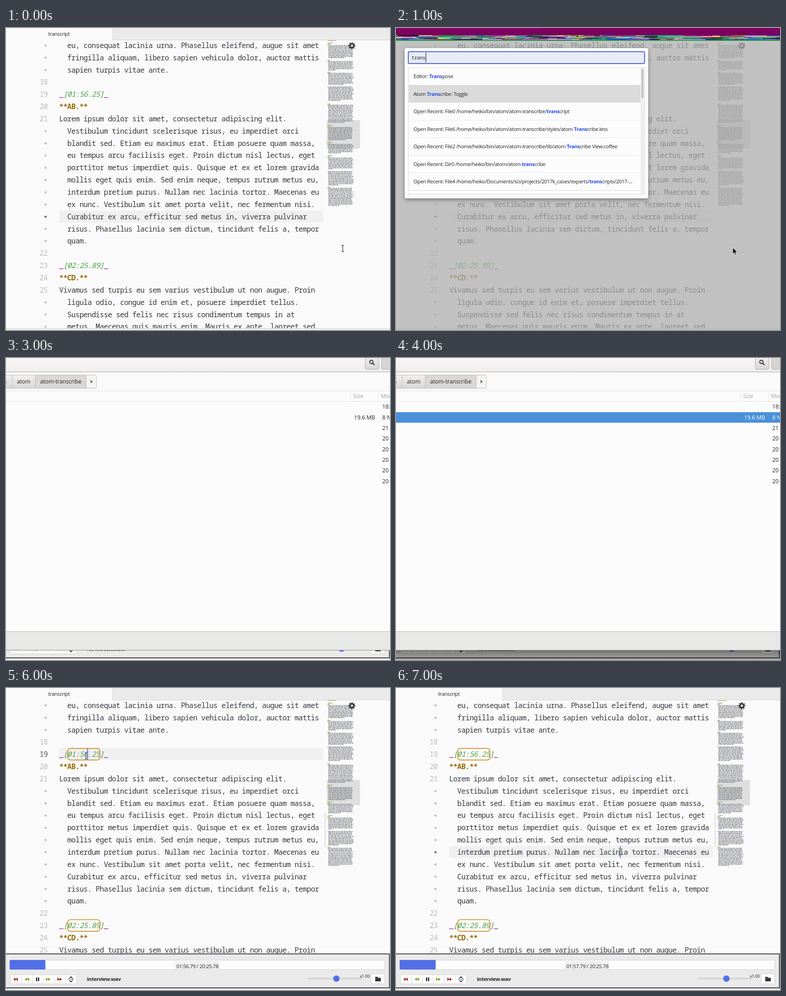
These frames come from a looping animation (845x663 px, 8000 ms). An HTML page:

```html
<!DOCTYPE html>
<html lang="en">
<head>
<meta charset="utf-8">
<title>Transcribe demo</title>
<style>
html, body { margin: 0; width: 100%; height: 100%; overflow: hidden; background: #fafafa; }
svg { display: block; width: 845px; height: 663px; }
text { white-space: pre; }
.code { font: 16px "Noto Sans Mono", monospace; letter-spacing: -.67px; fill: #383a42; }
.num { fill: #bdbdbd; }
.ui { font: 11.3px "Open Sans", "Noto Sans", sans-serif; letter-spacing: -.37px; fill: #232324; }
.b { font-weight: 700; }
.hit { font-weight: 700; fill: #2450e8; }
.field { font: 11px "Noto Sans Mono", monospace; letter-spacing: -.45px; fill: #232324; }
.rate { font-size: 9.4px; letter-spacing: -.3px; }
.file { font: 12.2px "Open Sans", "Noto Sans", sans-serif; fill: #222; }
.mark { fill: #a626a4; }
.time { fill: #50a14f; font-style: italic; }
.name { fill: #986801; font-weight: 700; }
</style>
</head>
<body>
<svg id="stage" viewBox="0 0 845 663">
  <defs>
    <linearGradient id="button" x2="0" y2="1"><stop stop-color="#f1f0ef"/><stop offset="1" stop-color="#d8d7d5"/></linearGradient>
    <linearGradient id="header" x2="0" y2="1"><stop stop-color="#f6f5f4"/><stop offset="1" stop-color="#f0efee"/></linearGradient>
    <linearGradient id="shade" x2="0" y2="1"><stop stop-opacity=".3"/><stop offset="1" stop-opacity="0"/></linearGradient>
    <clipPath id="listClip"><path d="M27 87H538V365H27z"/></clipPath>
    <filter id="shadow" x="-10%" y="-10%" width="120%" height="120%"><feDropShadow dx="0" dy="3" stdDeviation="4" flood-opacity=".4"/></filter>
  </defs>
  <g id="scene"></g>
</svg>
<script>
const PITCH = 26.85, COL = 8.935, LEFT = 117;
const BLUE = '#526fe8';
const PROSE = [
  ['', 'eu, consequat lacinia urna. Phasellus eleifend, augue sit amet'],
  ['', 'fringilla aliquam, libero sapien vehicula dolor, auctor mattis'],
  ['', 'sapien turpis vitae ante.'],
  [18, ''], [19, '_[01:56.25]_'], [20, '**AB.**'],
  [21, 'Lorem ipsum dolor sit amet, consectetur adipiscing elit.'],
  ['', 'Vestibulum tincidunt scelerisque risus, eu imperdiet orci'],
  ['', 'blandit sed. Etiam eu maximus erat. Etiam posuere quam massa,'],
  ['', 'eu tempus arcu facilisis eget. Proin dictum nisl lectus, eget'],
  ['', 'porttitor metus imperdiet quis. Quisque et ex et lorem gravida'],
  ['', 'mollis eget quis enim. Sed enim neque, tempus rutrum metus eu,'],
  ['', 'interdum pretium purus. Nullam nec lacinia tortor. Maecenas eu'],
  ['', 'ex nunc. Vestibulum sit amet porta velit, nec fermentum nisi.'],
  ['', 'Curabitur ex arcu, efficitur sed metus in, viverra pulvinar'],
  ['', 'risus. Phasellus lacinia sem dictum, tincidunt felis a, tempor'],
  ['', 'quam.'],
  [22, ''], [23, '_[02:25.89]_'], [24, '**CD.**'],
  [25, 'Vivamus sed turpis eu sem varius vestibulum ut non augue. Proin'],
  ['', 'ligula odio, congue id enim et, posuere imperdiet tellus.'],
  ['', 'Suspendisse sed felis nec risus condimentum tempus in at'],
  ['', 'metus. Maecenas quis mauris enim. Mauris ex ante, laoreet sed']
];
const COMMANDS = [
  'Editor: *Trans*pose',
  'Atom *Trans*cribe: Toggle',
  'Open Recent: File0 /home/heiko/bin/atom/atom-transcribe/*trans*cript',
  'Open Recent: File6 /home/heiko/bin/atom/atom-transcribe/styles/atom *Trans*cribe.less',
  'Open Recent: File2 /home/heiko/bin/atom/atom-transcribe/lib/atom *Trans*cribe View.coffee',
  'Open Recent: Dir0 /home/heiko/bin/atom/atom-*trans*cribe',
  'Open Recent: File4 /home/heiko/Documents/sci/projects/2017k_cases/experts/*trans*cripts/2017-...'
];
// One entry per second
const STEPS = [
  { row: 14, view: 63, beam: [741, 484] },
  { row: 14, view: 63, palette: true },
  { row: 14, view: 58, caret: 395, bar: true, beam: [741, 484], torn: true },
  { row: 14, view: 58, bar: true, dialog: true },
  { row: 14, view: 58, bar: true, dialog: true, chosen: true },
  { row: 14, view: 55, caret: 395, bar: true, play: 2.98, beam: [176, 149] },
  { row: 4, view: 55, caret: 179.5, bar: true, play: 116.79, beam: [176, 149] },
  { row: 12, view: 55, caret: 493.5, bar: true, play: 117.79, beam: [493, 360] }
];

const rect = (x, y, w, h, fill, more = '') => `<rect x="${x}" y="${y}" width="${w}" height="${h}" fill="${fill}" ${more}/>`;
const path = (d, fill, more = '') => `<path d="${d}" fill="${fill}" ${more}/>`;
const line = (d, color, width = 1) => path(d, 'none', `stroke="${color}" stroke-width="${width}"`);
const text = (x, y, cls, s, more = '') => `<text x="${x}" y="${y}" class="${cls}" ${more}>${s}</text>`;
const span = (cls, s) => `<tspan class="${cls}">${s}</tspan>`;
const dot = (x, y, r, fill, more = '') => `<circle cx="${x}" cy="${y}" r="${r}" fill="${fill}" ${more}/>`;
const mid = i => 38.4 + PITCH * i;
const rowTop = i => Math.round(mid(i) - 13.4);

function random(seed) {
  return () => (seed = seed * 16807 % 2147483647) / 2147483647;
}

function codeLine([num, s], i, active) {
  const y = mid(i), base = y + 5.4;
  const gutter = num
    ? text(91.5, base, 'code num', num, 'text-anchor="end"' + (active ? ' style="fill:#555"' : ''))
    : dot(87, y, 2.4, active ? '#666' : '#bdbdbd');
  let body = s;
  if (s[0] === '_') body = span('mark', '_') + span('time', s.slice(1, -1)) + span('mark', '_');
  if (s[0] === '*') body = span('name', s);
  return gutter + text(LEFT + (num ? 0 : 2 * COL), base, 'code', body);
}

function makeMinimap() {
  const rnd = random(77), step = 2.67;
  let words = '', out = rect(708, 26.8, 19, 1.4, '#d9917f');
  // top, rows, has time stamp, has speaker
  const blocks = [
    [38.5, 11, 1, 1], [73.5, 8, 0, 1], [99.5, 10, 0, 1], [129.5, 12, 0, 0], [169.5, 15, 0, 1],
    [218.5, 11, 1, 1], [255.5, 8, 1, 1], [285.5, 10, 1, 1], [315, 12, 0, 0], [352, 15, 0, 1]
  ];
  for (const [top, rows, stamp, speaker] of blocks) {
    if (stamp) out += rect(708, top - 2 * step - .8, 10.5, 1.6, '#84c283');
    if (speaker) out += rect(707.5, top - step - .8, 6, 1.6, '#c09a4c');
    for (let i = 0; i < rows; i++) {
      let x = i ? 709.3 : 707.7;
      const end = i === rows - 1 ? 716 + rnd() * 34 : 761 + rnd() * 4;
      while (x < end - 1) {
        const w = Math.min(2 + rnd() * 6, end - x);
        words += `M${x.toFixed(1)} ${(top + i * step).toFixed(1)}h${w.toFixed(1)}`;
        x += w + 1;
      }
    }
  }
  return out + line(words, '#7f8086', 1.5);
}
const minimap = makeMinimap();

function editor(s) {
  const gear = dot(761, 39, 4.2, 'none', 'stroke="#333" stroke-width="3"')
    + dot(761, 39, 6.4, 'none', 'stroke="#333" stroke-width="2.6" stroke-dasharray="2.51" transform="rotate(-11 761 39)"');
  let out = rect(0, 0, 845, 663, '#fafafa')
    + rect(LEFT, rowTop(s.row), 581, 26, '#f0f0f0')
    + PROSE.map((l, i) => codeLine(l, i, i === s.row)).join('')
    + rect(706, 202, 73, s.view, '#dedede') + minimap + gear
    + rect(234, 0, 611, 27, '#eaeaea') + line('M234.5 0V26.5H845', '#dbdbdc')
    + text(93, 17, 'ui', 'transcript')
    + rect(0, 659, 845, 4, '#f0f0f0') + line('M0 659.5H845', '#cfcfcf');
  if (s.bar) out += rect(701, 275, 3, 75, '#e4e4e4', 'rx="1.5"');
  if (s.play) out += [4, 18].map(i =>
    rect(135.8, mid(i) - 13.2, 70.8, 25.6, 'none', 'rx="6" stroke="#d18a1c" stroke-width="1.7"')).join('');
  if (s.caret) out += rect(s.caret - 1, rowTop(s.row), 2, 26, '#526fff');
  return out;
}

function arrows(x, dir, color) {
  const tri = a => `M${x + a * dir} 636l${5 * dir} 3.5l${-5 * dir} 3.5z`;
  return path(tri(-5) + tri(0), color);
}

const clock = t => [t / 60 | 0, (t % 60).toFixed(2).padStart(5, '0')].join(':').padStart(8, '0');

function bar(play) {
  const top = play ? 583.7 : 615.2;
  const [from, to, knob] = play ? [663, 785, 727] : [684, 803, 738.5];
  let out = rect(-2, top, 845.6, 658.3 - top, '#eaeaea', 'stroke="#111" stroke-width="1.5"')
    + rect(9.5, 629.5, 146, 20, '#fdfdfd', 'rx="2" stroke="#d2d2d2"')
    + line([34, 58, 81, 106, 131].map(x => `M${x}.5 630v19`).join(''), '#dcdcdc')
    + arrows(21, -1, '#b3131b') + arrows(46, -1, '#83a00c')
    + arrows(93, 1, '#83a00c') + arrows(118, 1, '#b3131b')
    + (play ? rect(66, 635.5, 2.6, 8, '#222') + rect(70.4, 635.5, 2.6, 8, '#222') : path('M66.5 635.5l6 4l-6 4z', '#333'))
    + rect(141, 633.5, 4, 12, '#333') + dot(143, 639.5, 4.2, '#fff', 'stroke="#333" stroke-width="1.3"')
    + line('M143 637v3h2', '#333', .9)
    + text(178, 643, 'ui b', play ? 'interview.wav' : 'No file selected.')
    + rect(from, 636.5, to - from, 3, '#d2d2d2', 'rx="1.5"') + dot(knob, 638, 7, BLUE)
    + rect(803.5, 627.5, 30, 22, '#fcfcfc', 'rx="3" stroke="#d2d2d2"')
    + path('M812.5 634h5l1.2 2h6v8h-12.2z', '#333') + line('M812.5 636.7h12', '#777', .7);
  if (play) out += rect(8.5, 597.5, 825, 20.5, '#fdfdfd', 'rx="2" stroke="#d0d0d0"')
    + rect(8, 597, play / 1225.78 * 826, 21, BLUE, play > 9 ? 'rx="2"' : '')
    + rect(371, 600, 99, 18, '#f0f0f0', 'rx="3"')
    + text(375, 615, 'ui', clock(play) + ' / 20:25.78')
    + text(778.5, 636, 'ui rate', 'x1.00');
  return out;
}

function palette() {
  const rows = COMMANDS.map((c, i) => {
    const y = 87 + 38.5 * i, p = c.split('*');
    return rect(27, y, 511, 38.5, i === 1 ? '#dbdbdb' : '#fcfcfc') + line(`M27 ${y + 38.5}h511`, '#dadada')
      + text(38.5, y + 23, 'ui', p[0] + span('hit', p[1]) + p[2]);
  }).join('');
  return rect(0, 0, 845, 663, '#acacac', 'opacity=".72"')
    + rect(19, 44, 536, 330, '#fafafa', 'rx="4" filter="url(#shadow)"')
    + rect(27, 52, 520, 26, '#e8ebf8', 'rx="3" stroke="#4d66d6" stroke-width="2"')
    + text(34, 69, 'field', 'trans') + rect(65, 54, 1.3, 22, '#333')
    + rect(27, 87, 520, 278, '#fcfcfc')
    + `<g clip-path="url(#listClip)">${rows}</g>`
    + rect(538, 87, 9, 278, '#efefef') + rect(540, 90, 4.5, 64, '#c4c4c4', 'rx="2"')
    + rect(27.5, 87.5, 519, 277.5, 'none', 'stroke="#dadada"')
    + path('M741 482v14.5l3.4-3.2l2.3 5.2l2.4-1l-2.3-5.1h4.7z', '#111', 'stroke="#fff" stroke-width=".9"');
}

function dialog(chosen) {
  const btn = (x, w, fill) => rect(x + .5, 37.5, w, 29, fill, 'stroke="#bdbbb8"');
  const dates = ['18:', '8 N', '21', '20', '20', '20', '20', '20'];
  let out = chosen ? rect(0, 0, 845, 663, '#000', 'opacity=".31"') + rect(0, 642, 845, 17, 'url(#shade)') : '';
  out += rect(0, 0, 845, 642, '#fcfcfc') + rect(0, 0, 845, 30, 'url(#header)') + line('M0 30.5H845', '#a5a3a0')
    + rect(790.5, -6, 30, 31, 'url(#button)', 'rx="3" stroke="#adaba8"')
    + rect(826.5, -6, 30, 31, '#d6d5d3', 'rx="3" stroke="#adaba8"')
    + dot(804, 8.5, 3.7, 'none', 'stroke="#222" stroke-width="1.8"') + line('M806.8 11.3l4 4', '#222', 2.2)
    + rect(0, 31, 845, 41, '#fafafa')
    + rect(150.5, 37.5, 48.5, 29, '#f5f4f3', 'rx="3" stroke="#bdbbb8"')
    + btn(-20, 33, 'url(#button)') + btn(13, 51, 'url(#button)') + btn(64, 112, '#d9d8d6')
    + path('M186 47.5l5 4.3l-5 4.3z', '#777')
    + text(1.5, 56, 'file', 'bin', 'text-anchor="end"') + text(24, 56, 'file', 'atom') + text(75, 56, 'file', 'atom-transcribe')
    + line('M0 72.5H845M0 95.5H845M757.5 73V95M819.5 73V95', '#e4e3e2')
    + text(764, 88, 'file b', 'Size', 'style="fill:#a0a0a0"') + text(825, 88, 'file b', 'Modified', 'style="fill:#a0a0a0"');
  if (chosen) out += rect(0, 119, 845, 23, '#4a90d9');
  dates.forEach((d, i) => {
    const ink = chosen && i === 1 ? 'style="fill:#fff"' : '';
    const y = 111.4 + 23.3 * i;
    out += text(828, y, 'file', d, ink);
    if (i === 1) out += text(766, y, 'file', '19.6 MB', ink);
  });
  return out + rect(0, 600, 845, 42, '#e8e8e6') + line('M0 600.5H845', '#b9b8b6') + line('M0 641.5H845', '#8b8a88');
}

// Torn window title: rows of coloured runs
function runs(rnd, y0, y1, x0, short, long, colors) {
  let out = '';
  for (let y = y0; y < y1; y++) {
    for (let x = x0; x < 845;) {
      const w = short + rnd() * (long - short) | 0;
      out += rect(x, y, Math.min(w, 845 - x), 1, colors[rnd() * colors.length | 0]);
      x += w;
    }
  }
  return out;
}
const stripes = (y0, y1, colors) => {
  let out = '';
  for (let y = y0; y < y1; y++) out += rect(0, y, 845, 1, colors[(y - y0) % colors.length]);
  return out;
};
const VIVID = ['#1e9c4c', '#d23bb4', '#25b4c0', '#d8d040', '#3144c8', '#141414', '#8a1670', '#e8e4e8'];
const tornDim = rect(0, 0, 845, 28, '#7b005c') + rect(0, 1, 315, 1, '#b4007e') + rect(310, 3, 535, 1, '#a00070')
  + runs(random(91), 16, 26, 0, 4, 60, VIVID) + rect(0, 26, 845, 2, '#1f8d44');
const tornLit = rect(0, 0, 845, 26, '#7a1b78') + rect(0, 0, 241, 6, '#0b6470')
  + runs(random(35), 0, 7, 241, 3, 30, ['#d23bb4', '#141414', '#8a1670', '#c428a0', '#3144c8', '#2aa84c'])
  + stripes(6, 23, ['#8a1a6c', '#3a58c8', '#c03a68', '#1c8c90', '#a43a9c', '#c84a50'])
  + runs(random(58), 17, 20, 0, 10, 90, VIVID)
  + rect(0, 23, 845, 2, '#22a4b4') + rect(0, 25, 845, 1, '#24303a');

function beam([x, y]) {
  const d = `M${x - 3} ${y - 7}h2.2l.8 .8l.8 -.8h2.2M${x} ${y - 6.5}v13M${x - 3} ${y + 7}h2.2l.8 -.8l.8 .8h2.2`;
  return line(d, '#fff', 2.6) + line(d, '#222', 1.2);
}

function scene(s) {
  let out = editor(s);
  if (s.bar) out += bar(s.play);
  if (s.palette) out += palette() + tornDim;
  if (s.torn) out += tornLit;
  if (s.dialog) out += dialog(s.chosen);
  if (s.beam) out += beam(s.beam);
  return out;
}

const scenes = STEPS.map(scene);
const root = document.getElementById('scene');
let shown = -1;
function draw() {
  const step = Math.floor(performance.now() % 8000 / 1000);
  if (step !== shown) root.innerHTML = scenes[shown = step];
  requestAnimationFrame(draw);
}
draw();
</script>
</body>
</html>
```
